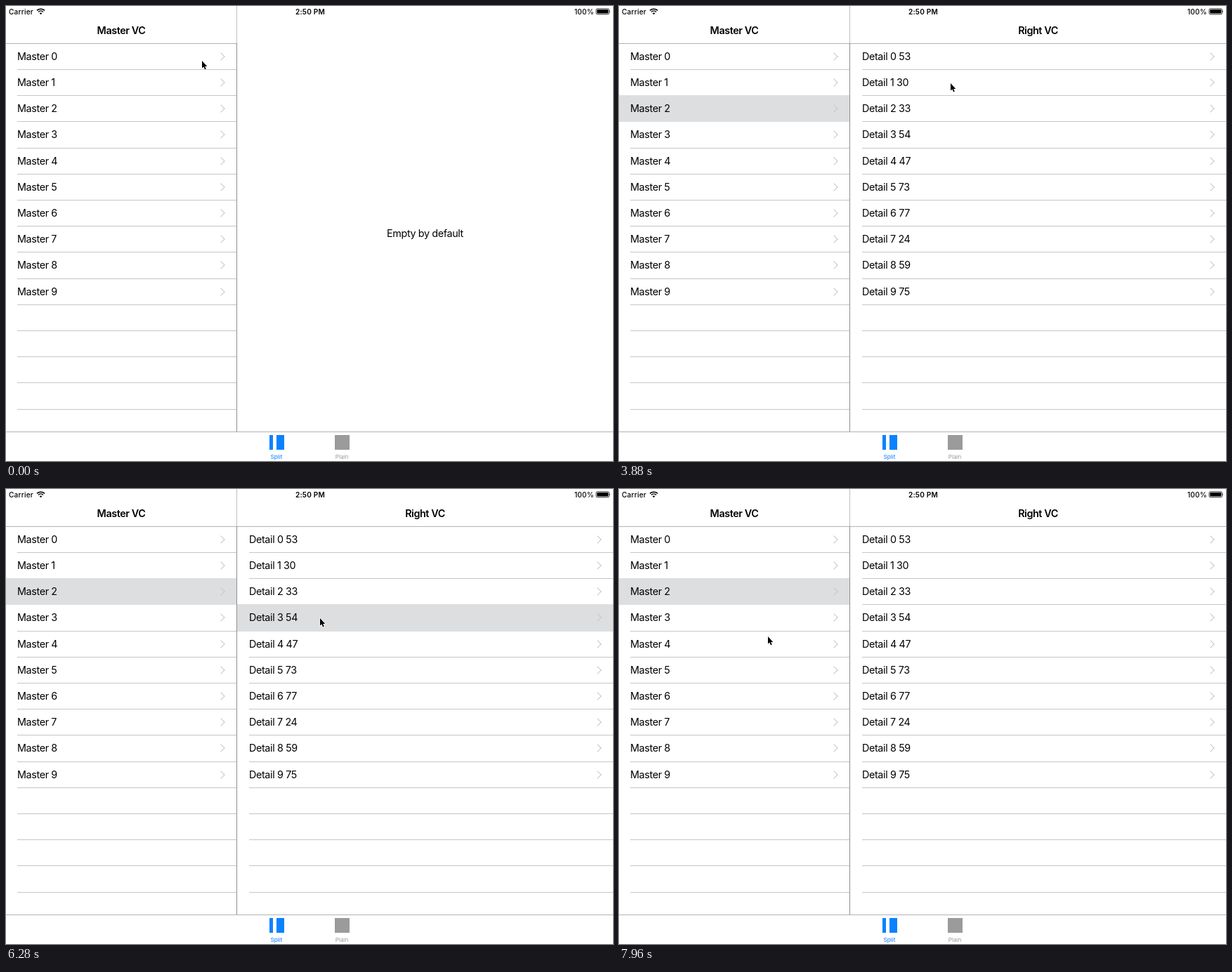
Recreate the animation shown at these times as an HTML page. Size 864 by 648 pixels, loop 8000 ms.

```html
<!DOCTYPE html>
<html lang="en">
<head>
<meta charset="utf-8">
<title>Split view</title>
<style>
/* --p: 1 = list showing, 0 = detail page fully pushed over it */
@property --p { syntax: "<number>"; inherits: true; initial-value: 1; }

html, body { margin: 0; width: 100%; height: 100%; overflow: hidden; background: #fff; }
#stage {
  position: relative; width: 864px; height: 648px; overflow: hidden; background: #fff;
  font: 14.34px Inter, sans-serif; letter-spacing: -.36px; color: #000; white-space: pre;
}
#stage div, #stage svg { position: absolute; }

.pane { top: 0; height: 606px; overflow: hidden; }
#master { left: 0; width: 328px; }
#detail { left: 329px; width: 535px; animation: page 8s cubic-bezier(.38, .7, .125, 1) infinite; }
.title { top: 16px; width: 100%; line-height: 38px; text-align: center; font-weight: 600; letter-spacing: -.4px; }
.navline { top: 53px; width: 100%; height: 1px; background: #b2b2b2; }
.body { top: 54px; width: 100%; height: 552px; overflow: hidden; }
.list { top: -54px; width: 100%; height: 606px; }

.row { width: 100%; line-height: 35px; }
.row span { position: relative; left: var(--inset); }
.row i { position: absolute; left: 0; font-style: normal; }
.row.item::after {
  content: ""; position: absolute; right: 18.5px; top: 13.5px; width: 8px; height: 8px;
  box-sizing: border-box; border: solid #c7c7cc; border-width: 1.5px 1.5px 0 0; transform: rotate(45deg);
}
.row .sel { inset: -1px 0 0; background: #dddee0; }
.sep { left: var(--inset); right: 0; bottom: 0; height: 1px; background: #c6c6c8; }
#master { --inset: 16px; }
#detail { --inset: 17px; }

#detail .list { transform: translateX(calc((var(--p) - 1) * 160.5px)); }
#page {
  left: 0; width: 100%; height: 100%; background: #fff;
  transform: translateX(calc(var(--p) * 535px));
  box-shadow: -1px 0 3px rgba(0, 0, 0, calc((1 - var(--p)) * .4));
}
#rightTitle {
  transform: translateX(calc((var(--p) - 1) * 240px));
  opacity: calc(min(.2, var(--p)) + .8 * clamp(0, (var(--p) - .85) * 6.67, 1));
}
#pageTitle {
  --q: calc(1 - var(--p));
  transform: translateX(calc(var(--p) * (215px + 97px * var(--p))));
  opacity: calc(.4 * var(--q) + .6 * var(--q) * var(--q) * var(--q) * var(--q));
}
#back { left: 0; top: 16px; color: #007aff; line-height: 38px; opacity: clamp(0, 1 - var(--p) * 2.5, 1); }
#back div { left: 22px; transform: translateX(calc(var(--p) * 200px)); }
#back svg { left: 7px; top: 10px; }
#press { animation: press 8s step-end infinite; }

.status { top: 0; line-height: 16px; font-size: 10.1px; font-weight: 500; letter-spacing: .2px; }
.tab { top: 636px; width: 60px; text-align: center; font-size: 8.2px; line-height: 12px; letter-spacing: 0; }
.box { top: 610.5px; height: 21.5px; }

@keyframes page {
  0%, 52.5% { --p: 1; }
  58.75%, 65.85% { --p: 0; }
  72.1%, 79.5% { --p: 1; }
  85.75%, 91.325% { --p: 0; }
  97.575%, 100% { --p: 1; }
}
@keyframes press {
  0% { opacity: 1; }
  64.5% { opacity: .25; }
  72.1% { opacity: 1; }
  89% { opacity: .25; }
  97.575%, 100% { opacity: 1; }
}
</style>
</head>
<body>
<div id="stage">
  <div class="pane" id="master">
    <div class="title">Master VC</div>
    <div class="navline"></div>
    <div class="body"><div class="list"></div></div>
  </div>

  <div class="pane" id="detail">
    <div id="empty" style="top:306px;width:100%;line-height:36px;text-align:center">Empty by default</div>
    <div id="right" style="inset:0">
      <div class="title" id="rightTitle">Right VC</div>
      <div class="title" id="pageTitle"></div>
      <div id="back"><div id="press" style="left:0">
        <svg width="12" height="18" fill="none" stroke="#007aff" stroke-width="2"><path d="M10 1.5 2.5 9l7.500 7.500"/></svg>
        <div>Right VC</div>
      </div></div>
      <div class="navline"></div>
      <div class="body"><div class="list"></div><div id="page"></div></div>
    </div>
  </div>

  <div style="left:328px;top:0;width:1px;height:53px;background:#c0c0c0"></div>
  <div style="left:328px;top:53px;width:1px;height:553px;background:#8f8f8f"></div>

  <div class="status" style="left:4px">Carrier</div>
  <div class="status" style="left:333px;width:200px;text-align:center;font-weight:600">2:50 PM</div>
  <div class="status" style="right:27px">100%</div>
  <svg style="left:43px;top:2px" width="13" height="11" fill="none" stroke="#000" stroke-width="1.500">
    <path d="M1 4.400a7.800 7.800 0 0 1 11 0M3 6.500a5 5 0 0 1 7 0"/>
    <path d="M6.500 10.200 4.700 8.300a2.600 2.600 0 0 1 3.600 0z" fill="#000" stroke="none"/>
  </svg>
  <svg style="left:839px;top:3px" width="24" height="10">
    <rect x="1" y=".8" width="18.500" height="8" rx="2" fill="none" stroke="#000" stroke-width=".8"/>
    <rect x="2.200" y="2" width="16.100" height="5.600" rx="1"/>
    <path d="M20.500 3.300q1.300 1.500 0 3z"/>
  </svg>

  <div style="left:0;top:606px;width:100%;height:1px;background:#b2b2b2"></div>
  <div class="box" style="left:375px;width:5.3px;background:#0a82ff"></div>
  <div class="box" style="left:385.3px;width:10.7px;background:#0a82ff"></div>
  <div class="box" style="left:468px;width:21px;background:#9b9b9b"></div>
  <div class="tab" style="left:355px;color:#0a7aff">Split</div>
  <div class="tab" style="left:448px;color:#999">Plain</div>

  <svg id="cursor" style="left:-2px;top:-2px" width="14" height="20">
    <path d="M2 2v10.600l2.400-2.100 1.700 3.900 1.700-.8-1.700-3.700h3.200z" stroke="#fff" stroke-width="1.400" paint-order="stroke"/>
  </svg>
</div>

<script>
const LOOP = 8000;
const $ = s => document.querySelector(s);

function add(parent, tag, cls = "", text = "") {
  const el = document.createElement(tag);
  el.className = cls;
  el.textContent = text;
  parent.append(el);
  return el;
}

const loop = (el, frames) => el.animate(frames, { duration: LOOP, iterations: Infinity });

// Visible between two times (ms), with an optional fade at the end.
function show(el, from, to, fade = 0) {
  const stops = [[from, 1], [to, 1]];
  if (from > 0) stops.unshift([0, 0], [from, 0]);
  if (to < LOOP) stops.push([to + fade, 0], [LOOP, 0]);
  loop(el, stops.map(([t, opacity]) => ({ offset: t / LOOP, opacity })));
}

const lineY = k => Math.floor(53.2 + 37.2 * k);

function fill(list, label, picks) {
  const rows = [];
  for (let k = 0; k < 14; k++) {
    const row = add(list, "div", k < 10 ? "row item" : "row");
    row.style.top = lineY(k) + 1 + "px";
    row.style.height = lineY(k + 1) - lineY(k) + "px";
    add(row, "div", "sep");
    for (const [n, ...times] of picks) {
      if (n === k) show(add(row, "div", "sel"), ...times);
    }
    if (k < 10) rows.push(add(row, "span", "", `${label} ${k}`));
  }
  return rows;
}

fill($("#master .list"), "Master", [[0, 680, 2520], [1, 2520, 3360], [2, 3360, LOOP]]);
const details = fill($("#detail .list"), "Detail", [[1, 4120, 5768, 130], [3, 6280, 7806, 120]]);

const sets = [
  [720, 2560, "42 13 86 23 65 33 23 83 10 37"],
  [2560, 3400, "71 48 19 62 35 80 27 94 16 58"],
  [3400, LOOP, "53 30 33 54 47 73 77 24 59 75"]
];
details.forEach((row, k) => {
  row.append(" ");
  const slot = add(row, "span");
  slot.style.left = 0;
  for (const [from, to, nums] of sets) show(add(slot, "i", "", nums.split(" ")[k]), from, to);
});

show($("#empty"), 0, 720);
show($("#right"), 720, LOOP);

for (const [name, from, to] of [["Detail 1 30", 4120, 6100], ["Detail 3 54", 6280, LOOP]]) {
  const el = add($("#pageTitle"), "div", "", name);
  el.style.width = "100%";
  show(el, from, to);
}

// Pointer tip: time, x, y
const path = [
  [0, 279, 78], [1590, 279, 78], [1600, 278, 78], [1770, 278, 78],
  [2080, 263, 118], [2220, 263, 118], [2320, 263, 120], [2810, 263, 120],
  [3120, 260, 150], [3530, 260, 150], [3880, 472, 110], [4300, 472, 110],
  [4920, 389, 29], [5450, 389, 29], [5920, 447, 184], [6450, 447, 184],
  [7080, 384, 29], [7410, 384, 29], [7960, 212, 210], [LOOP, 212, 210]
];
loop($("#cursor"), path.map(([t, x, y]) => ({
  offset: t / LOOP, transform: `translate(${x}px, ${y}px)`, easing: "ease-in-out"
})));
</script>
</body>
</html>
```
